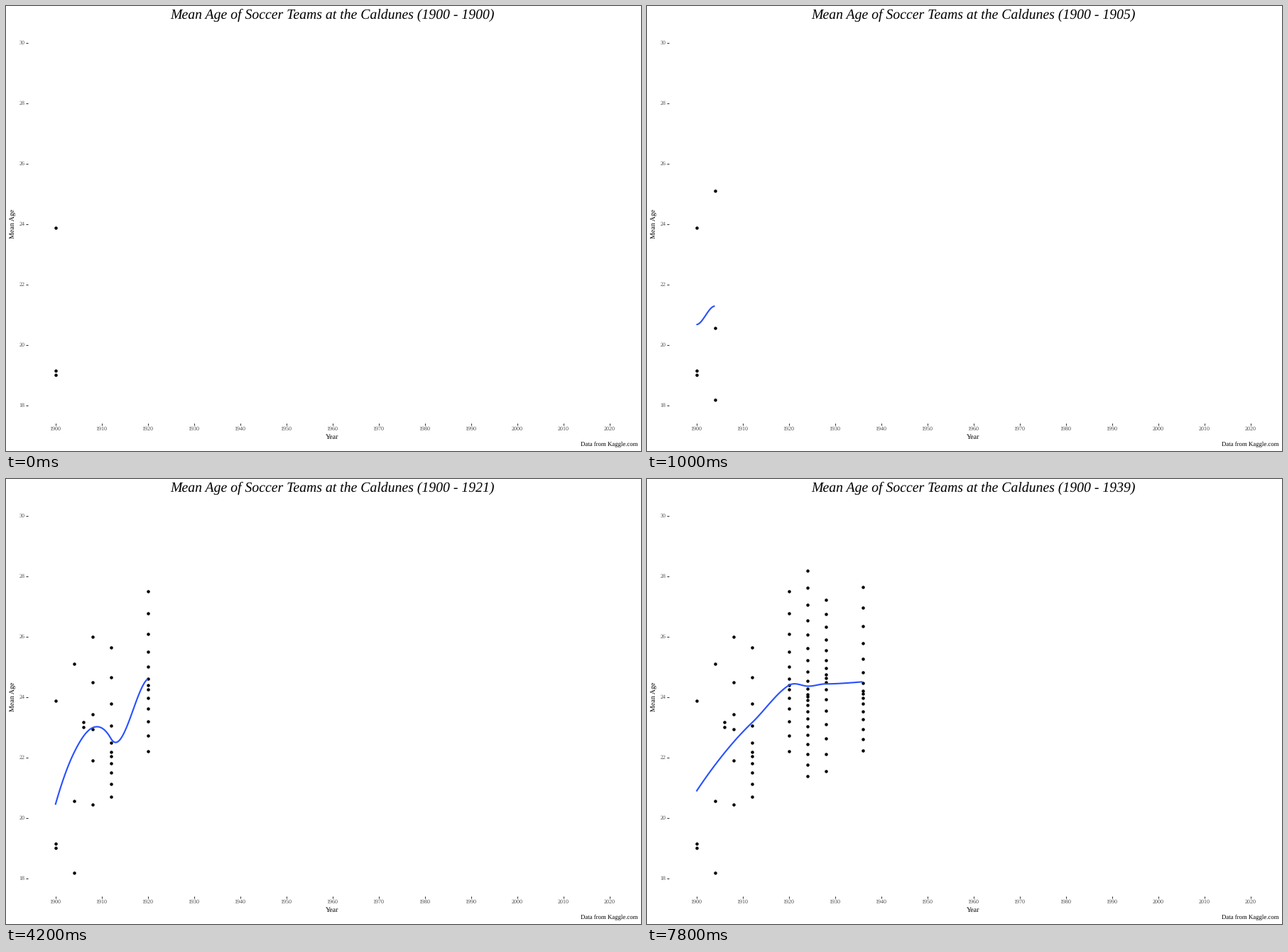
Animation of 894 by 626 pixels, one loop 8000 ms. Source, as a matplotlib script:

```python
import numpy as np
import matplotlib.pyplot as plt
from matplotlib.animation import FuncAnimation

W, H, DPI = 894, 626, 100
PX = 72 / DPI
FRAMES, INTERVAL = 40, 200
START = 1900
DARK_YEAR = 1904
LEFT, BOTTOM = 30.5, 587
SPAN, CELL = 0.75, 0.2
BLUE = "#2850ff"

# Games: number of teams, then lowest, middle and highest mean age
GAMES = {
    1900: (3, 19.0, 19.14, 23.86),
    1904: (3, 18.18, 20.56, 25.09),
    1906: (2, 23.0, 23.08, 23.17),
    1908: (6, 20.43, 23.17, 26.0),
    1912: (11, 20.7, 22.17, 25.64),
    1920: (13, 22.2, 24.39, 27.5),
    1924: (22, 21.37, 24.04, 28.18),
    1928: (17, 21.55, 24.62, 27.22),
    1936: (16, 22.22, 24.14, 27.64),
}


def spread(count, low, mid, high):
    """Ages that crowd around the middle and thin out to both ends."""
    t = np.linspace(-1, 1, count)
    return mid + np.where(t < 0, low - mid, high - mid) * np.abs(t) ** 1.5


YEARS = np.repeat(np.array(list(GAMES), float), [g[0] for g in GAMES.values()])
AGES = np.concatenate([spread(*g) for g in GAMES.values()])


def px(year):
    return LEFT + (year - 1894) * 6.5


def py(age):
    return 51.5 + (30 - age) * 42.5


def local_fit(x, y, at):
    """Value and slope at one point of a local quadratic fit."""
    dist = np.abs(x - at)
    radius = np.sort(dist)[int(len(x) * SPAN + 1e-5) - 1]
    near = dist < radius * 0.9995 if radius > 0 else dist == 0
    d = (x - at)[near]
    ratio = dist[near] / radius if radius > 0 else 0 * d
    w = np.sqrt((1 - ratio ** 3) ** 3)
    cols = np.stack([np.ones_like(d), d, d * d], axis=1) * w[:, None]
    norm = np.linalg.norm(cols, axis=0)
    norm[norm == 0] = 1
    coef = np.linalg.lstsq(cols / norm, y[near] * w, rcond=1e-10)[0] / norm
    return coef[0], coef[1]


def find_knots(x):
    """Split the range at medians until each cell holds few points."""
    limit = int(len(x) * SPAN * CELL)
    knots = {x[0], x[-1]}

    def split(first, last, low, high):
        if last - first + 1 <= limit:
            return
        mid = (first + last) // 2
        cut = x[mid - 1]
        if cut in (low, high):
            return
        knots.add(cut)
        split(first, mid, low, cut)
        split(mid + 1, last, cut, high)

    split(1, len(x), x[0], x[-1])
    return np.array(sorted(knots))


def smooth(x, y):
    """Loess curve: cubic pieces between the fitted knots."""
    knots = find_knots(x)
    val, slope = np.array([local_fit(x, y, k) for k in knots]).T
    xs = np.linspace(x[0], x[-1], 80)
    i = np.clip(np.searchsorted(knots, xs, "right") - 1, 0, len(knots) - 2)
    h = knots[i + 1] - knots[i]
    u = (xs - knots[i]) / h
    ys = (val[i] * (1 + 2 * u) * (1 - u) ** 2
          + val[i + 1] * u * u * (3 - 2 * u)
          + h * slope[i] * u * (1 - u) ** 2
          - h * slope[i + 1] * u * u * (1 - u))
    return px(xs), py(ys)


CURVES = {}
for games in list(GAMES)[1:]:
    seen = YEARS <= games
    CURVES[games] = smooth(YEARS[seen], AGES[seen])

plt.rcParams["font.family"] = "Liberation Serif"
plt.rcParams["text.hinting"] = "none"
fig = plt.figure(figsize=(W / DPI, H / DPI), dpi=DPI, facecolor="white")
ax = fig.add_axes([0, 0, 1, 1])
ax.set_xlim(0, W)
ax.set_ylim(H, 0)
ax.axis("off")


def label(x, y, text, size, color="black", **kw):
    kw = {"ha": "center", "va": "baseline", **kw}
    return ax.text(x, y, text, fontsize=size * PX, color=color, **kw)


tick_labels, tick_marks = [], []


def tick(xs, ys):
    tick_marks.extend(ax.plot(xs, ys, lw=1.07 * PX, color="#333333",
                              solid_capstyle="butt"))


for year in range(1900, 2021, 10):
    tick([px(year)] * 2, [BOTTOM, BOTTOM + 2.75])
    tick_labels.append(label(px(year), 597.4, str(year), 8, "#4d4d4d"))
for age in range(18, 31, 2):
    tick([LEFT - 2.75, LEFT], [py(age)] * 2)
    tick_labels.append(label(26.2, py(age) + 2.8, str(age), 8, "#4d4d4d",
                             ha="right"))

title = label(459.6, 18.2, "", 19.8, style="italic")
label(459.6, 609, "Year", 10)
label(13.6, 306.6, "Mean Age", 10, rotation=90, ha="right", va="center")
label(889, 619, "Data from Kaggle.com", 8.8, ha="right")

dots, = ax.plot([], [], "o", color="black", ms=4.5 * PX, mew=0, zorder=3,
                snap=False)
curve, = ax.plot([], [], lw=2.1 * PX, solid_capstyle="butt", zorder=4)


def draw(i):
    year = START + i
    dark = year == DARK_YEAR
    title.set_text(
        f"Mean Age of Soccer Teams at the Caldunes ({START} - {year})")
    seen = YEARS <= year
    dots.set_data(px(YEARS[seen]), py(AGES[seen]))
    curve.set_data(*CURVES.get(int(YEARS[seen][-1]), ([], [])))

    fig.set_facecolor("#424242" if dark else "white")
    curve.set_color("#141414" if dark else BLUE)
    for t in tick_labels:
        t.set_color("#141414" if dark else "#4d4d4d")
    for t in tick_marks:
        t.set_color("#0c0c0c" if dark else "#333333")
    return ()


anim = FuncAnimation(fig, draw, frames=FRAMES, interval=INTERVAL,
                     init_func=lambda: draw(0), repeat=True, repeat_delay=0)
plt.show()
```
